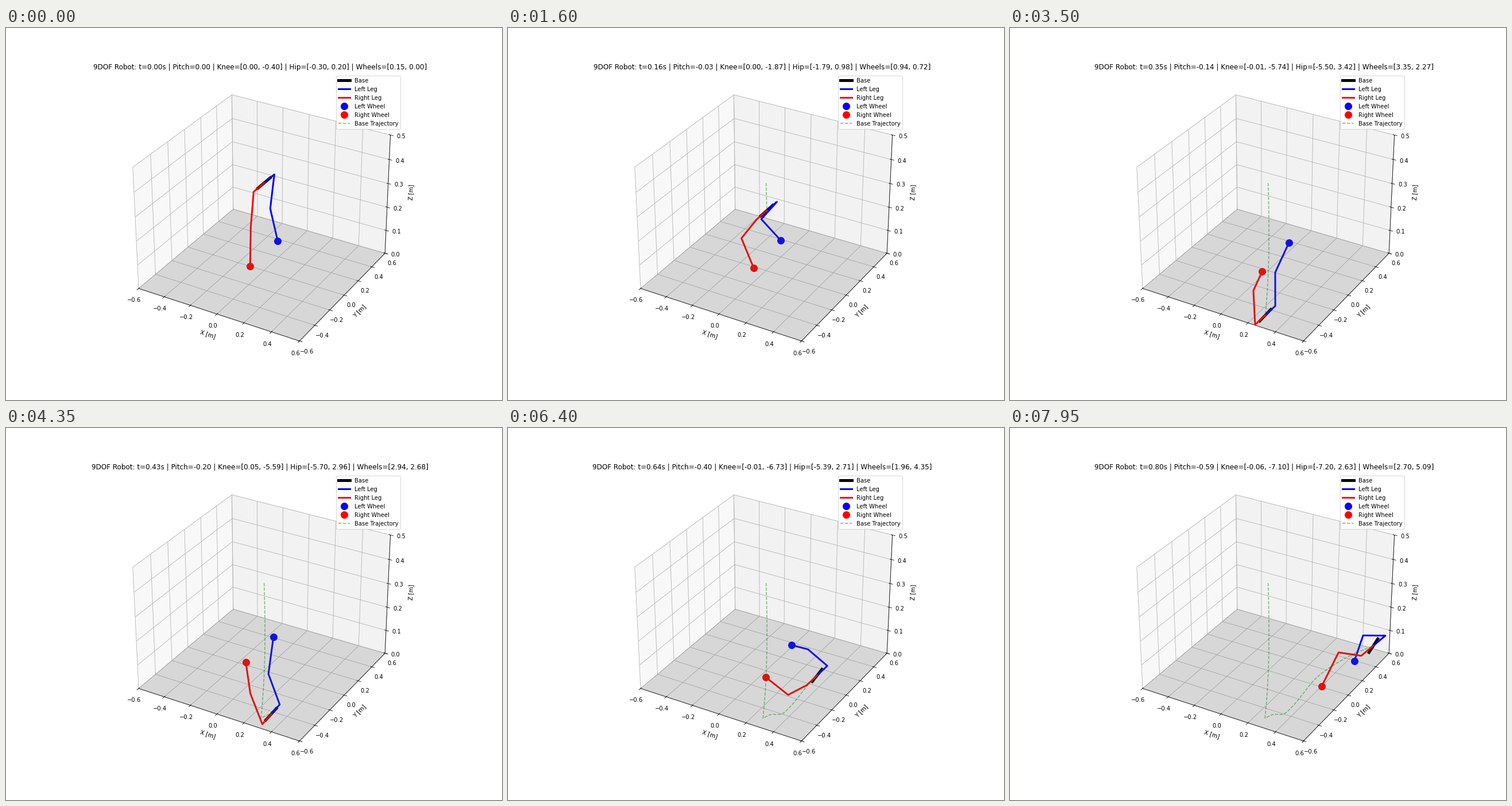
Animation of 864x648 px, one loop 8 s. Source, as a matplotlib script:

```python
import numpy as np
import matplotlib.pyplot as plt
from matplotlib.animation import FuncAnimation

FRAMES, STEP = 160, 50
IMPACT = 3.54
LINK, HIP, AXLE, BASE = 0.15, 0.133, 0.182, 0.08

t = np.arange(FRAMES) * STEP / 1000


def spline(times, values, start=1.0):
    """Cubic Hermite curve over all frames; start scales the first slope."""
    times, values = np.array(times), np.array(values, float)
    slope = np.gradient(values, times, axis=0)
    slope[0] *= start
    i = np.clip(np.searchsorted(times, t, "right") - 1, 0, len(times) - 2)
    h = (times[i + 1] - times[i])[:, None]
    u = (t - times[i])[:, None] / h
    a, b = values[i], values[i + 1]
    return (a + (b - a) * u * u * (3 - 2 * u)
            + h * u * (1 - u) * (slope[i] * (1 - u) - slope[i + 1] * u))


# Time, left knee, right knee, left hip, right hip, wheel angle
JOINT_KEYS = np.array([
    (0, -0.40, -0.30, 0.20, 0.15, 0),
    (1.6, -1.87, -1.79, 0.98, 0.94, 0.72),
    (2.8, -3.66, -3.56, 2.32, 2.29, 1.23),
    (3.5, -5.74, -5.50, 3.42, 3.35, 2.27),
    (5.25, -5.68, -5.78, 2.61, 2.50, 3.22),
    (6.4, -6.73, -5.39, 2.71, 1.96, 4.35),
    (7.95, -7.10, -7.20, 2.63, 2.70, 5.09),
])
# Time and base position after the impact
DRIFT_KEYS = np.array([
    (IMPACT, -0.025, 0, -0.2165),
    (4.25, 0.042, 0, -0.187),
    (4.9, 0.1355, 0, -0.163),
    (5.25, 0.19, 0, -0.1225),
    (6.4, 0.49, -0.2, 0.126),
    (7.2, 0.819, -0.494, 0.341),
    (7.95, 1.132, -0.767, 0.5225),
])

falling = spline(JOINT_KEYS[:4, 0], JOINT_KEYS[:4, 1:], start=0.5)
driving = spline(JOINT_KEYS[3:, 0], JOINT_KEYS[3:, 1:])
joints = np.where((t < JOINT_KEYS[3, 0])[:, None], falling, driving)
knee_l, knee_r, hip_l, hip_r, spin = joints.T

pitch = -0.59 * (t / t[-1]) ** 1.78
roll = np.where(t < 3.4, 0.001 * t**2,
                0.065 * np.sin(np.pi * (t - 3.65) / 2.6))
yaw = 1.3 * roll

fall = np.column_stack([0.0025 * t**2 - 0.0001 * t**5, 0 * t,
                        0.3698 - 0.0428 * t**2.07])
drift = spline(DRIFT_KEYS[:, 0], DRIFT_KEYS[:, 1:])
base = np.where((t < IMPACT)[:, None], fall, drift)


def place(ahead, side, up, turn):
    """World position of a point given relative to the base."""
    c, s = np.cos(turn), np.sin(turn)
    return base + np.column_stack([ahead * c - side * s,
                                   ahead * s + side * c, up + 0 * t])


def leg_path(hip, knee, sign):
    """Base, hip, knee and wheel points for every frame."""
    thigh = hip + 2.1 * pitch
    shin = thigh + knee
    x1, z1 = -LINK * np.sin(thigh), -LINK * np.cos(thigh)
    x2, z2 = x1 - LINK * np.sin(shin), z1 - LINK * np.cos(shin)
    return np.stack([base,
                     place(0, sign * HIP, 0, yaw),
                     place(x1, sign * HIP, z1, yaw),
                     place(x2, sign * AXLE, z2, yaw)], axis=1)


left = leg_path(hip_l, knee_l, 1)
right = leg_path(hip_r, knee_r, -1)
bar = np.stack([place(0, side, 0, -0.25 * pitch) for side in (-BASE, BASE)],
               axis=1)

fig = plt.figure(figsize=(12, 9), dpi=72)
ax = fig.add_subplot(111, projection="3d")
gx, gy = np.meshgrid([-0.6, 0.6], [-0.6, 0.6])
ax.plot_surface(gx, gy, np.zeros_like(gx), color="gray", alpha=0.2)


def add(fmt, label, **style):
    return ax.plot([], [], [], fmt, label=label, **style)[0]


base_line = add("k-", "Base", lw=5)
left_leg = add("b-", "Left Leg", lw=3)
right_leg = add("r-", "Right Leg", lw=3)
left_wheel = add("bo", "Left Wheel", markersize=12)
right_wheel = add("ro", "Right Wheel", markersize=12)
trail = add("g--", "Base Trajectory", lw=1.5, alpha=0.5)

ax.set(xlim=(-0.6, 0.6), ylim=(-0.6, 0.6), zlim=(0, 0.5),
       xlabel="X [m]", ylabel="Y [m]", zlabel="Z [m]")
title = ax.set_title("")
ax.legend(loc="upper right")


def pair(a, b):
    return f"[{round(a, 2) + 0.0:.2f}, {round(b, 2) + 0.0:.2f}]"


def update(i):
    base_line.set_data_3d(*bar[i].T)
    left_leg.set_data_3d(*left[i].T)
    right_leg.set_data_3d(*right[i].T)
    left_wheel.set_data_3d(*left[i, 3:].T)
    right_wheel.set_data_3d(*right[i, 3:].T)
    trail.set_data_3d(*base[:i + 1].T)
    title.set_text(
        f"9DOF Robot: t={i * 0.005:.2f}s | Pitch={round(pitch[i], 2) + 0.0:.2f}"
        f" | Knee={pair(roll[i], knee_l[i])} | Hip={pair(knee_r[i], hip_l[i])}"
        f" | Wheels={pair(hip_r[i], spin[i])}")
    return base_line, left_leg, right_leg, left_wheel, right_wheel, trail, title


anim = FuncAnimation(fig, update, frames=FRAMES, interval=STEP, repeat=True)
plt.show()
```
